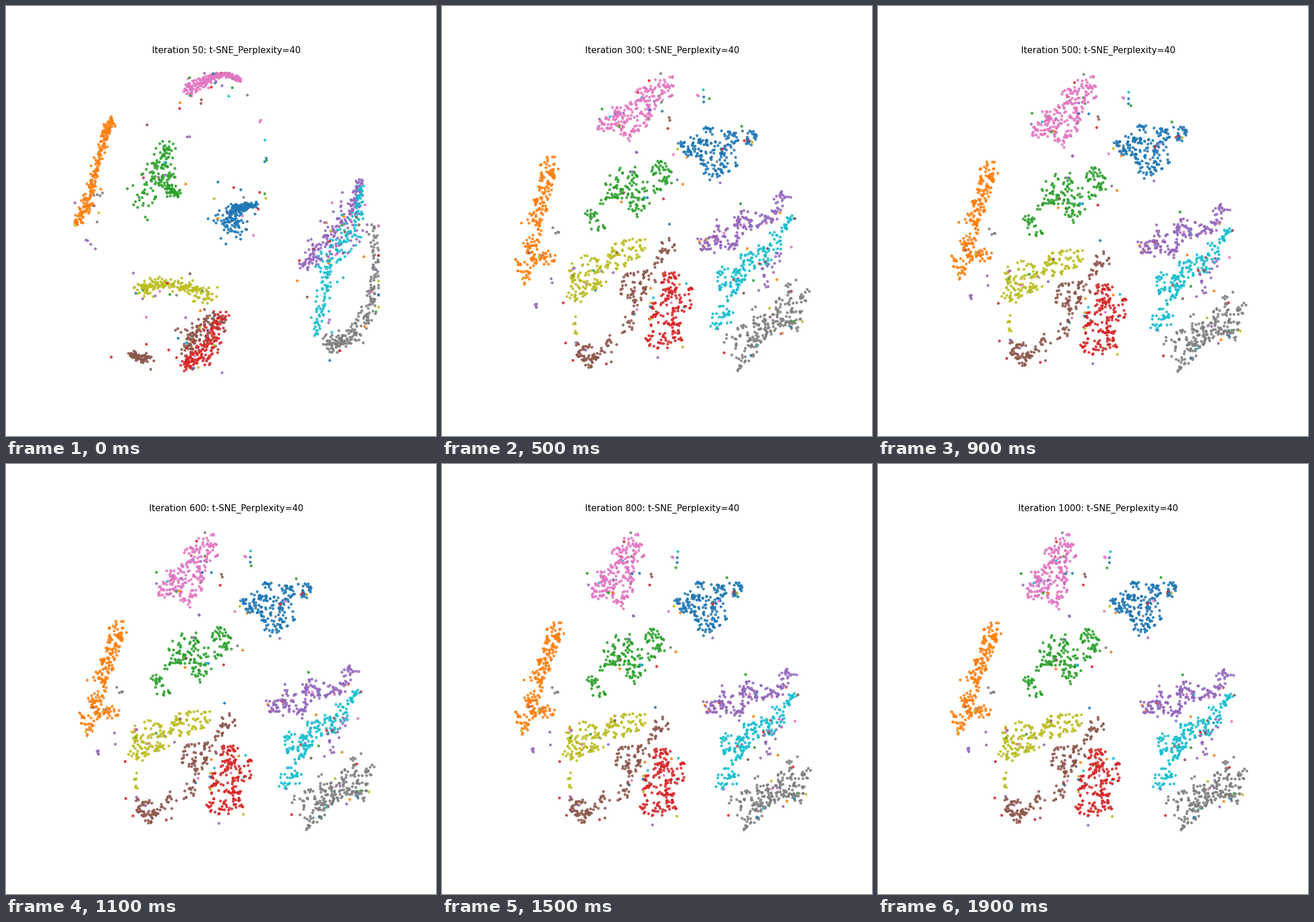
Animation of 748x748 px, one loop 2 s. Source, as a matplotlib script:

```python
import numpy as np
import matplotlib.pyplot as plt
from matplotlib.animation import FuncAnimation
from matplotlib.path import Path

FRAMES = 20
LOW, HIGH = (120, 117), (648, 640)  # extent of the data on the stage
rng = np.random.default_rng(11)

labels, earlies, lates, shifts = [], [], [], []


def add(label, early, late, shift):
    labels.append(np.broadcast_to(label, len(late)))
    earlies.append(early)
    lates.append(late)
    shifts.append(np.broadcast_to(shift, late.shape))


def fill(outline, n):
    """Even points inside an outline, a third of them huddled next to others."""
    shape = Path(outline)
    lo, hi = np.min(outline, axis=0), np.max(outline, axis=0)
    pts = rng.uniform(lo, hi, (40 * n, 2))
    pts = pts[shape.contains_points(pts)][:n]
    k = n // 3
    pts[:k] = pts[rng.integers(k, n, k)] + rng.normal(0, 3, (k, 2))
    return pts


def trail(knots, n):
    """Points strewn along a line of knots (x, y, spread)."""
    knots = np.array(knots, float)
    t = np.linspace(0, len(knots) - 1, n)
    x, y, spread = (np.interp(t, range(len(knots)), col) for col in knots.T)
    return np.c_[x, y] + rng.normal(size=(n, 2)) * spread[:, None]


def cluster(label, n, outline, axis, ends, knots):
    """Outline at rest, how far its two ends lie off at step 200, first trail."""
    pts = fill(outline, n)
    head, tail = np.array(axis, float)
    along = (pts - head) @ (tail - head) / np.sum((tail - head) ** 2)
    order = np.argsort(along)
    t = np.clip(along[order], 0, 1)[:, None]
    shift = np.array(ends[0]) * (1 - t) + np.array(ends[1]) * t
    add(label, trail(knots, n), pts[order], shift)


cluster(0, 205,
        [(400, 250), (440, 204), (482, 208), (505, 194), (520, 214),
         (495, 240), (495, 275), (450, 302), (435, 268)],
        [(402, 250), (519, 214)], [(-6, 1), (27, 18)],
        [(370, 368, 12), (398, 385, 10), (395, 354, 4), (415, 350, 3), (434, 345, 3)])
cluster(1, 235,
        [(203, 270), (215, 290), (198, 330), (178, 385), (165, 420), (197, 427),
         (195, 437), (160, 440), (140, 473), (125, 460), (126, 430), (150, 410),
         (152, 375), (175, 325), (183, 288)],
        [(205, 275), (136, 472)], [(-23, -21), (4, 22)],
        [(184, 198, 4), (172, 225, 4), (155, 290, 3), (143, 338, 5), (122, 380, 3)])
cluster(2, 185,
        [(250, 375), (278, 350), (280, 305), (328, 293), (330, 325), (350, 318),
         (350, 292), (370, 282), (394, 325), (372, 332), (350, 365), (335, 383),
         (308, 350), (290, 350), (270, 368), (287, 405), (265, 408)],
        [(370, 290), (262, 390)], [(6, -26), (-14, -22)],
        [(302, 328, 4), (285, 320, 6), (277, 295, 10), (284, 245, 10),
         (248, 300, 9), (238, 350, 13)])
cluster(3, 190,
        [(376, 488), (392, 505), (400, 535), (420, 512), (425, 548), (400, 560),
         (408, 600), (375, 617), (340, 602), (348, 575), (343, 545), (366, 530),
         (364, 500)],
        [(376, 490), (365, 610)], [(9, -50), (0, -25)],
        [(376, 535, 7), (360, 570, 8), (348, 595, 14), (330, 610, 10), (313, 627, 4)])
cluster(4, 175,
        [(603, 355), (620, 372), (595, 405), (550, 412), (520, 440), (498, 430),
         (480, 445), (460, 432), (462, 408), (480, 405), (488, 380), (500, 412),
         (530, 374), (560, 385), (580, 395), (590, 375)],
        [(604, 372), (472, 425)], [(-17, -52), (-26, -13)],
        [(616, 302, 3), (603, 350, 7), (575, 390, 14), (545, 425, 12), (518, 454, 4)])
cluster(4, 20,
        [(600, 435), (575, 505), (545, 522), (560, 470)],
        [(600, 435), (550, 520)], [(-8, -20), (-12, -26)],
        [(622, 390, 8), (560, 440, 14)])
cluster(5, 110,
        [(404, 443), (395, 465), (375, 480), (355, 515), (330, 545), (322, 588),
         (303, 585), (312, 545), (297, 515), (305, 492), (345, 490), (365, 470),
         (372, 442)],
        [(385, 458), (313, 580)], [(3, -55), (-1, -25)],
        [(374, 545, 8), (345, 553, 12), (320, 575, 9), (315, 600, 7)])
cluster(5, 72,
        [(220, 578), (238, 580), (258, 592), (282, 572), (283, 603), (255, 605),
         (248, 630), (222, 607)],
        [(280, 595), (233, 600)], [(5, 5), (9, 8)],
        [(250, 612, 5), (230, 611, 4), (215, 607, 2)])
cluster(6, 235,
        [(328, 116), (343, 140), (347, 174), (330, 185), (334, 225), (312, 248),
         (254, 236), (260, 190), (300, 170), (286, 150), (300, 135)],
        [(328, 117), (280, 245)], [(76, 2), (0, -28)],
        [(408, 130, 2), (385, 118, 2), (362, 122, 3), (340, 134, 4), (312, 146, 7)])
cluster(7, 215,
        [(645, 522), (635, 548), (628, 592), (600, 582), (570, 595), (560, 615),
         (525, 640), (512, 600), (492, 585), (515, 572), (540, 560), (545, 530),
         (565, 560), (590, 535), (610, 515), (618, 545)],
        [(646, 522), (523, 639)], [(-2, -60), (-25, -1)],
        [(640, 380, 4), (642, 480, 5), (630, 535, 7), (600, 572, 9), (578, 588, 6),
         (560, 588, 7)])
cluster(8, 190,
        [(212, 505), (215, 465), (240, 448), (275, 452), (300, 436), (345, 432),
         (358, 458), (325, 470), (290, 480), (275, 502), (250, 500), (240, 520),
         (222, 520), (226, 575), (222, 575), (214, 535)],
        [(345, 450), (222, 574)], [(-13, -45), (8, 14)],
        [(355, 507, 8), (325, 492, 6), (290, 484, 6), (250, 486, 6), (232, 493, 5)])
cluster(9, 200,
        [(612, 393), (622, 412), (600, 440), (575, 475), (545, 480), (525, 508),
         (508, 530), (515, 555), (485, 572), (480, 545), (495, 510), (480, 478),
         (485, 462), (515, 478), (528, 450), (560, 448), (585, 420)],
        [(612, 398), (487, 568)], [(-8, -53), (-26, -3)],
        [(618, 314, 3), (610, 358, 5), (590, 410, 10), (560, 445, 11),
         (555, 500, 8), (536, 573, 4)])

# Small groups away from the clusters: label, size, late place, shift, early place
for label, n, late, shift, early in [
        (6, 2, (395, 163), (50, -10), (440, 200)),
        (0, 2, (403, 166), (53, -7), (449, 268)),
        (2, 1, (401, 182), (70, -29), (455, 267)),
        (4, 4, (155, 498), (5, 36), (143, 412)),
        (5, 2, (361, 196), (32, 4), (345, 171)),
        (7, 4, (197, 395), (-4, -5), (157, 325)),
        (4, 2, (331, 264), (-5, -15), (319, 224)),
        (0, 1, (370, 419), (22, -67), (345, 497))]:
    add(label, trail([(*early, 5)], n), trail([(*late, 3)], n), shift)

# Mislabelled points, each drifting along with a random member of some cluster
n = 130
host = rng.integers(0, sum(map(len, lates)), n)
add(rng.integers(0, 10, n),
    np.concatenate(earlies)[host] + rng.normal(0, 20, (n, 2)),
    np.concatenate(lates)[host] + rng.normal(0, 16, (n, 2)),
    np.concatenate(shifts)[host])

mix = rng.permutation(sum(map(len, lates)))
label, early, late, shift = (np.concatenate(a)[mix] for a in (labels, earlies, lates, shifts))


def place(step):
    u = max(0, (step - 200) / 800)
    fast = (1 - u) ** 3
    pts = late + shift * [(1 - u) ** 1.6, fast]
    # the middle of the map swings right before it settles
    swing = np.sin(np.pi * np.clip((late[:, 0] - 120) / 528, 0, 1))
    pts[:, 0] += 45 * fast * (1 - fast) * swing
    w = np.interp(step, [50, 100, 150, 200], [0, 0.4, 0.9, 1])
    return np.clip(early * (1 - w) + pts * w, LOW, HIGH)


fig, ax = plt.subplots(figsize=(8, 8), dpi=93.5)
ax.set_xlim(0.125 * 748, 0.9 * 748)
ax.set_ylim(0.89 * 748, 0.12 * 748)
ax.axis("off")
title = ax.set_title("", fontsize=11.87, fontfamily="DejaVu Sans")
dots = ax.scatter(early[:, 0], early[:, 1], s=8, c=label, cmap="tab10",
                  vmin=0, vmax=9, alpha=0.8)


def draw(i):
    step = 50 * (i + 1)
    dots.set_offsets(place(step))
    title.set_text(f"Iteration {step}: t-SNE_Perplexity=40")
    return dots, title


anim = FuncAnimation(fig, draw, frames=FRAMES, interval=100, repeat=True)
plt.show()
```
